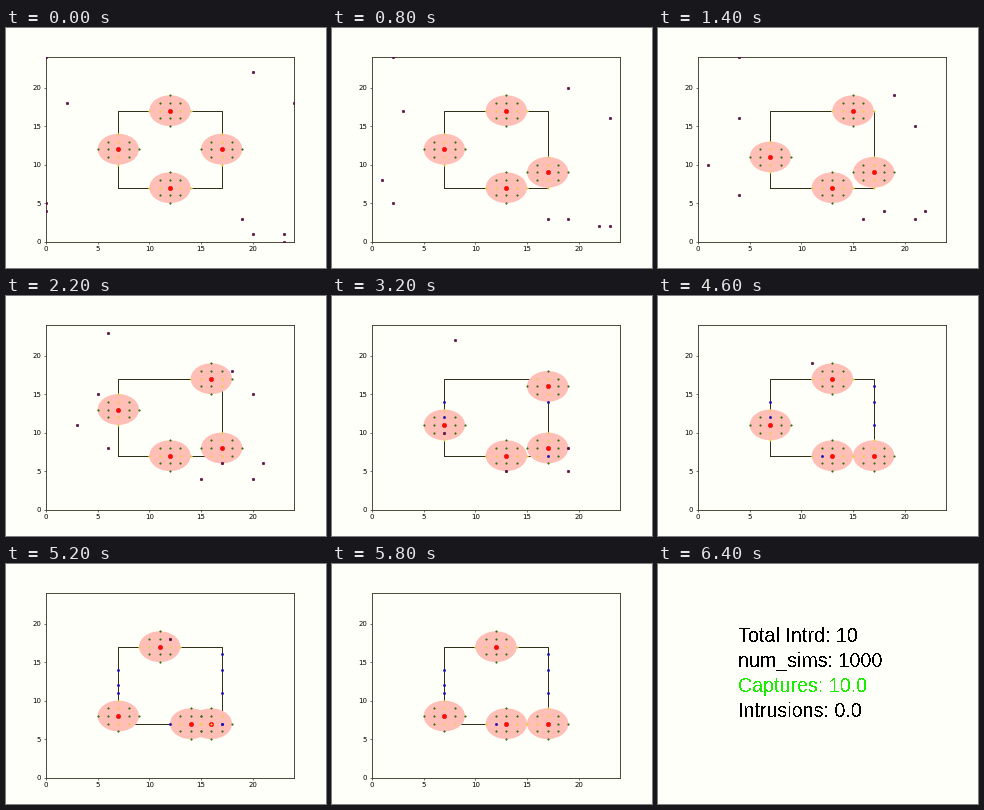
These frames come from a looping animation (320x240 px, 6600 ms). A matplotlib script:

```python
import numpy as np
import matplotlib.pyplot as plt
from matplotlib.animation import FuncAnimation
from matplotlib.patches import Circle

FRAMES, INTERVAL = 33, 200
LOW, HIGH = 7, 17
SIDE = HIGH - LOW
SWAY, PERIOD = 0.6, 10.2
PAPER, INK = "#fffffa", "#2a2a14"

# Each guard: step at which its sway peaks, then (step, distance) key points.
# Distance runs along the fence, clockwise from its lower left corner.
GUARDS = [
    (1.1, [(0, 5), (20, 5), (26, 1.5)]),
    (8, [(0, 15), (16, 21), (26, 14)]),
    (3.3, [(0, 25), (5, 28.6), (20, 28.6), (26, 31)]),
    (0, [(0, 34.5), (26, 34)]),
]

# Each intruder: start, point reached on the fence, arrival step, sideways bow.
INTRUDERS = [
    ((0, 24), (12, 17), 27, 2.8),
    ((2, 18), (7, 14), 16, 0),
    ((0, 5), (7, 12), 16, 2.4),
    ((0, 4), (7, 11), 17, -1.6),
    ((20, 22), (17, 16), 16, 0),
    ((24, 18), (17, 14), 16, 1),
    ((19, 3), (12, 7), 22, 1.1),
    ((20, 1), (17, 7), 13, 0),
    ((23, 1), (17, 7), 22, 0),
    ((23, 0), (17, 11), 22, -1.3),
]

# Cells a guard can see: all within two grid moves, except its own.
VIEW = [(dx, dy) for dx in range(-2, 3) for dy in range(-2, 3)
        if 0 < abs(dx) + abs(dy) <= 2]

SUMMARY = [("Total Intrd: 10", "black"), ("num_sims: 1000", "black"),
           ("Captures: 10.0", "#18ee00"), ("Intrusions: 0.0", "black")]


def fence_point(s):
    side, d = divmod(s % (4 * SIDE), SIDE)
    return [(LOW, LOW + d), (LOW + d, HIGH),
            (HIGH, HIGH - d), (HIGH - d, LOW)][side]


def on_fence(cell):
    x, y = cell
    inside = LOW <= x <= HIGH and LOW <= y <= HIGH
    return inside and (x in (LOW, HIGH) or y in (LOW, HIGH))


def guard_cell(step, peak, keys):
    sway = SWAY * np.cos(2 * np.pi * (step - peak) / PERIOD)
    return fence_point(int(round(np.interp(step, *zip(*keys)) + sway)))


def intruder_cell(step, start, goal, arrival, bow):
    """Walk a bowed line from start to goal, snapped to the grid."""
    p = min(step / arrival, 1)
    dx, dy = np.subtract(goal, start)
    normal = np.array([-dy, dx]) / np.hypot(dx, dy)
    pos = start + p * np.array([dx, dy]) + bow * np.sin(np.pi * p) * normal
    return tuple(np.rint(pos).astype(int))


def place(line, cells):
    line.set_data([c[0] for c in cells], [c[1] for c in cells])


fig, ax = plt.subplots(figsize=(6.4, 4.8), dpi=50, facecolor=PAPER)
ax.set(xlim=(0, 24), ylim=(0, 24), facecolor=PAPER,
       xticks=range(0, 24, 5), yticks=range(0, 24, 5))
for spine in ax.spines.values():
    spine.set(linewidth=1.3, edgecolor="#3c3c2c")

ax.plot([LOW, LOW, HIGH, HIGH, LOW], [LOW, HIGH, HIGH, LOW, LOW],
        color=INK, lw=1.4, zorder=1)


def dots(color, size, z, marker="."):
    return ax.plot([], [], marker, color=color, ms=size, zorder=z)[0]


class Guard:
    def __init__(self, peak, keys, z):
        self.peak, self.keys = peak, keys
        self.disc = ax.add_patch(Circle((0, 0), 2, fc="#ffbfb6", lw=0, zorder=2))
        self.off = dots("#2c7010", 4, z)
        self.on = dots("#e6d23c", 4, z)
        self.body = dots("#f80c08", 6, z + 0.5, "o")

    def move(self, step):
        x, y = cell = guard_cell(step, self.peak, self.keys)
        seen = [(x + dx, y + dy) for dx, dy in VIEW]
        self.disc.center = cell
        place(self.off, [c for c in seen if not on_fence(c)])
        place(self.on, [c for c in seen if on_fence(c)])
        place(self.body, [cell])
        return cell


guards = [Guard(*guard, z) for z, guard in enumerate(GUARDS, 4)]
roaming = dots("#5a1448", 7, 20)
captured = dots("#1a10b8", 6, 20)

lines = [fig.text(80 / 320, 1 - (78 + 25 * k) / 240, text, color=color,
                  family="Liberation Sans", size=28.2, antialiased=False)
         for k, (text, color) in enumerate(SUMMARY)]


def draw(step):
    finished = step == FRAMES - 1
    ax.set_visible(not finished)
    for line in lines:
        line.set_visible(finished)

    posts = [guard.move(step) for guard in guards]
    free, caught = [], []
    for start, goal, arrival, bow in INTRUDERS:
        cell = intruder_cell(step, start, goal, arrival, bow)
        if cell not in posts:
            (caught if step >= arrival else free).append(cell)
    place(roaming, free)
    place(captured, caught)


anim = FuncAnimation(fig, draw, frames=FRAMES, interval=INTERVAL,
                     init_func=lambda: draw(0), repeat=True, repeat_delay=0)
plt.show()
```
